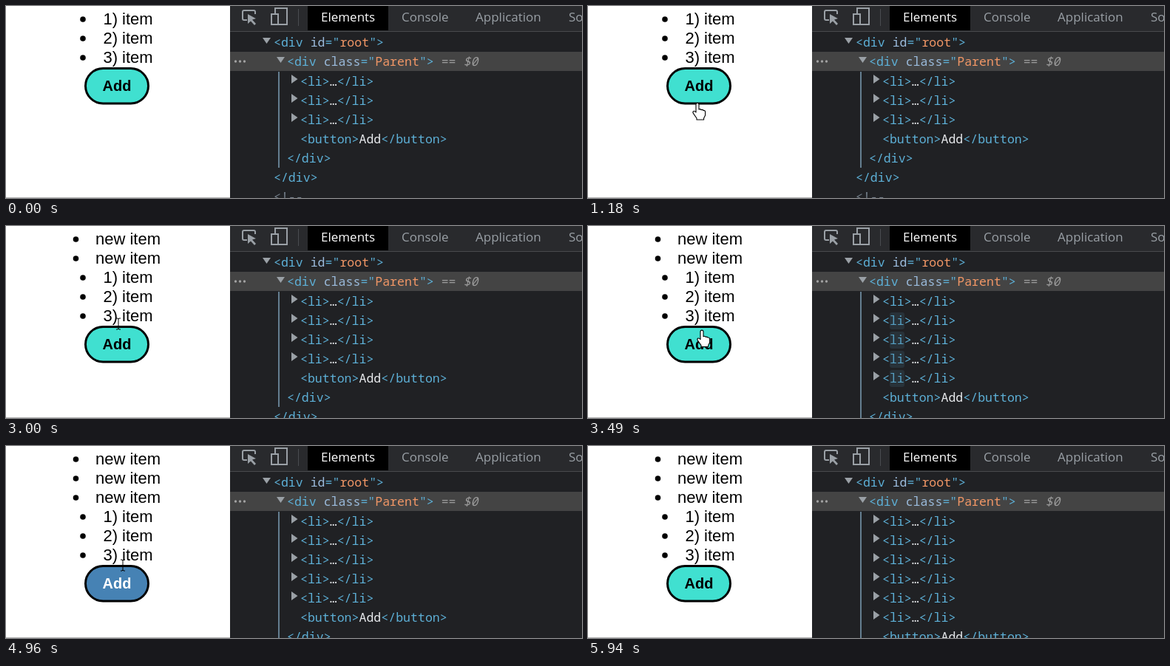
Write an HTML page that moves like this. It is 779 px wide and 260 px high and loops after 6010 ms.

```html
<!DOCTYPE html>
<html lang="en">
<head>
<meta charset="utf-8">
<title>Adding list items</title>
<style>
  html, body { margin: 0; width: 100%; height: 100%; overflow: hidden; background: #fff; }
  svg { display: block; width: 779px; height: 260px; }
  text { white-space: pre; }
  .page { font: 22px "Liberation Sans", Arial, sans-serif; }
  .btn { font: bold 20px "Liberation Sans", Arial, sans-serif; }
  .tab { font: 17px "Open Sans", "Noto Sans", sans-serif; fill: #9aa0a6; }
  .code { font: 16.57px "Noto Sans Mono", monospace; fill: #5db0d7; }
  .tip { font: 18.5px Roboto, sans-serif; fill: #8a8d91; }
</style>
</head>
<body>
<svg id="stage" viewBox="0 0 779 260"></svg>
<script>
const LOOP = 6010, STEP = 70, ROW = 26;
const blocks = [0, 130, 760, 1600, 2230, 2860, 3490, 4110, 4750, 5380];
const pageAdds = [1810, 2930, 4960];
const treeAdds = [1880, 3070, 5030];
// Pointer tip: time, x, y
const path = [
  [130, 660, 255], [410, 480, 158], [690, 270, 160], [1180, 148, 132],
  [1320, 149, 120], [2160, 149, 120], [2860, 152, 132], [3420, 152, 132],
  [3630, 158, 161], [5170, 158, 161], [5310, 330, 168], [5380, 440, 185],
  [5450, 531, 217], [5590, 640, 275]
];
const shapes = {
  arrow: "M0 0V16.5L3.8 13 6.6 20 9.6 18.8 6.7 12H11.8Z",
  hand: "M-2 12V1.5a2 2 0 0 1 4 0V8q2-1 3 .6 2-.6 3 .8 2.4-.4 2.6 2v4.6l-2 4V22H-1v-2l-4.6-6.6q-1.2-2 .4-3 1.6-.6 3.2 1.6z"
};

const count = (times, t) => times.filter(a => t >= a).length;
const mix = (a, b, p) => `rgb(${a.map((v, i) => Math.round(v + (b[i] - v) * p))})`;
const rect = (x, y, w, h, fill, more = "") =>
  `<rect x="${x}" y="${y}" width="${w}" height="${h}" fill="${fill}" ${more}/>`;
const text = (cls, x, y, body, more = "") =>
  `<text class="${cls}" x="${x}" y="${y}" ${more}>${body}</text>`;
const span = (fill, body) => `<tspan fill="${fill}">${body}</tspan>`;
const shape = (d, fill, more = "") => `<path d="${d}" fill="${fill}" ${more}/>`;
const code = (x, cy, body) => text("code", x, cy + 6, body);

function quantise(t) {
  const start = blocks.filter(b => b <= t).pop();
  return start + STEP * Math.min(8, Math.floor((t - start) / STEP));
}

function pointer(t) {
  if (t < path[0][0] || t > path[path.length - 1][0]) return null;
  const i = Math.max(1, path.findIndex(p => p[0] >= t));
  const [t0, x0, y0] = path[i - 1], [t1, x1, y1] = path[i];
  const p = (t - t0) / (t1 - t0);
  return { x: x0 + (x1 - x0) * p, y: y0 + (y1 - y0) * p };
}

const buttonTop = t => 83 + ROW * count(pageAdds, t);
function onButton(t) {
  const c = pointer(t), top = buttonTop(t);
  return c && c.x > 106 && c.x < 194 && c.y > top + 1 && c.y < top + 50;
}

// Index of the list row under the pointer in the tree, or -1
function treeRow(t) {
  const c = pointer(t);
  if (!c || c.x < 303 || c.y > 260) return -1;
  const r = Math.floor((c.y - 89) / ROW);
  return r < 3 + count(treeAdds, t) ? r : -1;
}

function page(t, hovered) {
  const added = count(pageAdds, t), top = buttonTop(t), hot = onButton(t - STEP);
  let out = rect(0, 0, 303, 260, "#fff") + rect(0, 259, 303, 1, "#b4b4b4");
  for (let i = 0; i < added + 3; i++) {
    const fresh = i < added, y = 25 + ROW * i;
    out += `<circle cx="${fresh ? 94.5 : 104}" cy="${y - 7}" r="3.8"/>`
      + text("page", fresh ? 121 : 131.4, y, fresh ? "new item" : `${i - added + 1}) item`);
  }
  out += rect(107.5, top + 1.5, 85, 47.5, hot ? "#4682b4" : "#40e0d0",
      'rx="23.75" stroke="#000" stroke-width="3"')
    + text("btn", 150, top + 32, "Add", `text-anchor="middle" fill="${hot ? "#fff" : "#000"}"`);
  return hovered < 0 ? out : out + inspectTip(5 + ROW * hovered);
}

function inspectTip(y) {
  return rect(9, y, 283, ROW, "#6fa8dc", 'opacity=".66"')
    + `<g style="filter:drop-shadow(0 0 2.5px #0006)">`
    + shape(`M12 ${y - 50}H167q3 0 3 3V${y - 13}q0 3-3 3H46L35 ${y + 1} 24 ${y - 10}H12q-3 0-3-3V${y - 47}q0-3 3-3z`, "#fff")
    + "</g>"
    + text("tip", 22, y - 23, "li", 'style="font-weight:bold;fill:#635d74"')
    + text("tip", 45, y - 23, "205.09 × 18.91");
}

function toolbar() {
  const line = 'stroke="#9aa0a6" stroke-width="2"';
  return rect(303, 0, 476, 34, "#292a2d") + rect(303, 34, 476, 1, "#484a4d")
    + rect(408, 0, 109, 33, "#000") + rect(395, 4, 1, 23, "#4a4c50")
    + shape("M326 19H322q-2 0-2-2V8q0-2 2-2H335q2 0 2 2V11", "none", line)
    + shape("M327 11V24L331 20.500 336 26 338 24 333 18.500 338 17Z", "#9aa0a6")
    + shape("M364 10V3H380V25H369M359 11H368V25H359Z", "none", line)
    + text("tab", 426, 21, "Elements", 'style="fill:#fff"')
    + text("tab", 535, 21, "Console") + text("tab", 635, 21, "Application")
    + text("tab", 761, 21, "Sources");
}

function tree(t, hovered) {
  const adds = count(treeAdds, t), n = 3 + adds;
  const down = (x, y) => shape(`M${x} ${y}h11l-5.500 8z`, "#9aa0a6");
  const attr = (name, value) => ` ${span("#9bbbdc", name)}="${span("#f29766", value)}"&gt;`;
  let out = rect(303, 35, 476, 225, "#202124") + rect(303, 62, 476, 26, "#444");
  if (hovered >= 0) out += rect(303, 89 + ROW * hovered, 476, 26, "#242a38");
  out += rect(368, 89, 2, ROW * (n + 2), "#647e90")
    + down(347, 43) + code(362, 49, "&lt;div" + attr("id", "root"))
    + down(366, 69) + code(380, 75, "&lt;div" + attr("class", "Parent")
      + span("#9c9c9c", ' == <tspan font-style="italic">$0</tspan>'));
  for (const x of [310.5, 316.5, 322.5]) out += `<circle cx="${x}" cy="75" r="1.7" fill="#a2a2a2"/>`;

  const age = adds ? (t - treeAdds[adds - 1]) / 1000 : 1;
  const fade = 1 - (1 - Math.min(1, age)) ** 3;
  for (let i = 0; i < n; i++) {
    const cy = 102 + ROW * i, lit = fade < 1 && i >= adds - 1;
    if (lit) out += rect(408, cy - 11, 20, 23, mix([72, 121, 142], [32, 33, 36], fade), 'rx="3"');
    const tag = lit ? span(mix([50, 86, 104], [93, 176, 215], fade), "li") : "li";
    out += shape(`M386 ${cy - 9}v12l8.500-6z`, "#9aa0a6")
      + code(398, cy, `&lt;${tag}&gt;${span("#e8eaed", "…")}&lt;/li&gt;`);
  }
  const y = 102 + ROW * n;
  return out + code(398, y, `&lt;button&gt;${span("#e8eaed", "Add")}&lt;/button&gt;`)
    + code(380, y + ROW, "&lt;/div&gt;") + code(362, y + 2 * ROW, "&lt;/div&gt;")
    + code(362, y + 3 * ROW, span("#747f8a", "&lt;!--"));
}

function cursor(t) {
  const c = pointer(t);
  if (!c) return "";
  const at = `transform="translate(${c.x} ${c.y})"`;
  const onText = c.x > 131 && c.x < 198 && c.y < buttonTop(t) + 1;
  if (onText) return shape("M-3-7H-1L0-6 1-7H3M0-6V7M-3 8H-1L0 7 1 8H3", "none", `stroke="#000" ${at}`);
  return shape(shapes[onButton(t) ? "hand" : "arrow"], "#fff",
    `stroke="#000" stroke-width="1.1" stroke-linejoin="round" ${at}`);
}

const stage = document.getElementById("stage");
const begin = performance.now();
let shown = -1;
function draw(now) {
  const t = quantise(Math.max(0, now - begin) % LOOP);
  if (t !== shown) {
    shown = t;
    const hovered = treeRow(t - STEP);
    stage.innerHTML = page(t, hovered) + tree(t, hovered) + toolbar() + cursor(t);
  }
  requestAnimationFrame(draw);
}
draw(begin);
</script>
</body>
</html>
```
